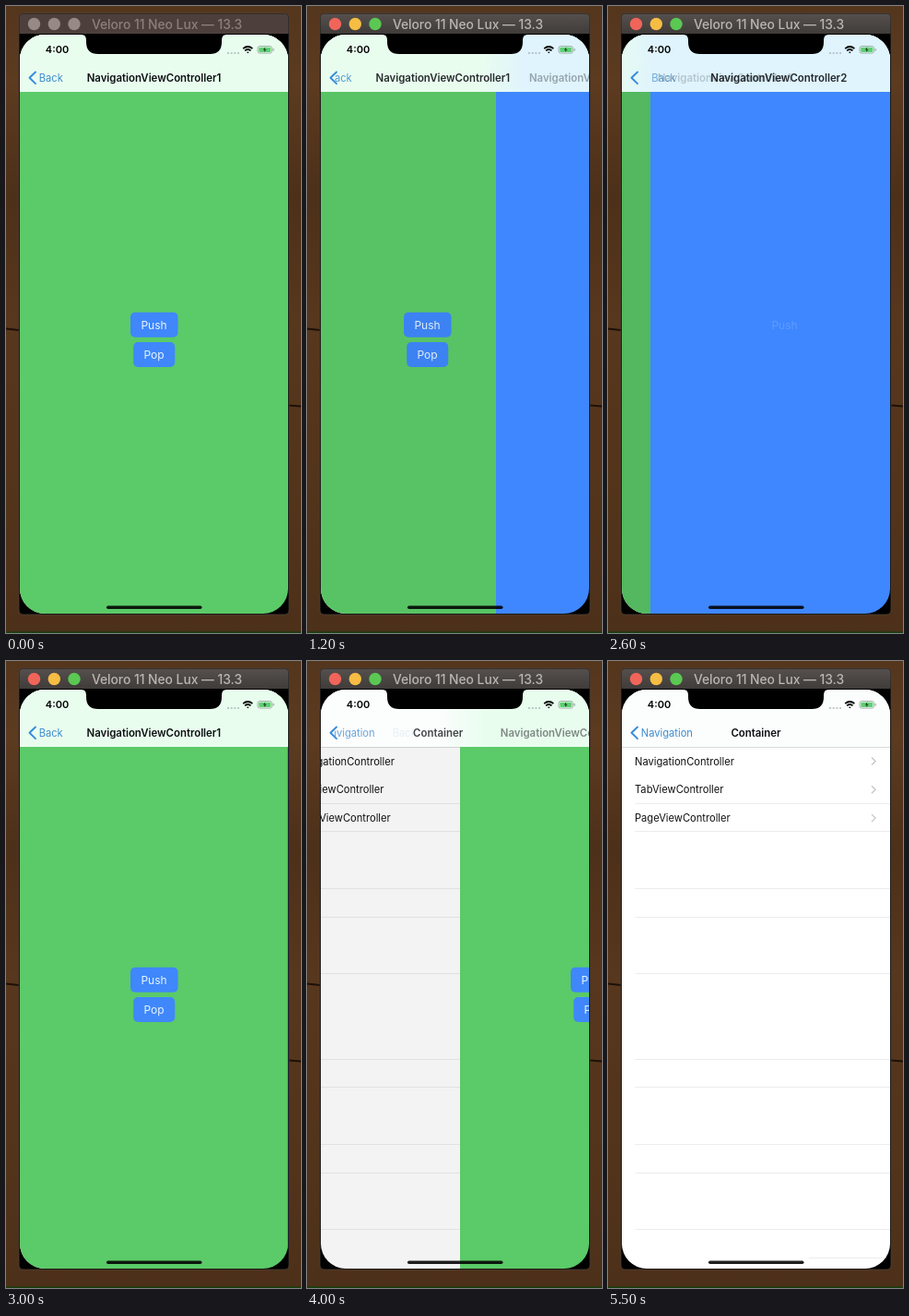
An HTML page for the animation above (5600 ms loop, 320 by 679 pixels).

```html
<!DOCTYPE html>
<html lang="en">
<head>
<meta charset="utf-8">
<title>Navigation stack</title>
<style>
  html, body { margin: 0; height: 100%; overflow: hidden; background: #52341c; }
  svg { display: block; width: 100vw; height: 100vh; font: 11.15px Inter, Roboto, sans-serif; }
  .title { font-size: 11.4px; font-weight: 600; text-anchor: middle; fill: #0c0f12; }
  .back { fill: #3d8bcf; }
  .button { fill: #3f87fb; }
  .label { font-size: 12px; text-anchor: middle; fill: #e9f5ff; }
</style>
</head>
<body>
<svg viewBox="0 0 320 679">
  <defs>
    <linearGradient id="wood" x2="0" y2="1">
      <stop offset="0" stop-color="#54361d"/>
      <stop offset=".12" stop-color="#5c3b20"/>
      <stop offset=".3" stop-color="#4d3019"/>
      <stop offset=".5" stop-color="#57371d"/>
      <stop offset=".8" stop-color="#52341b"/>
      <stop offset="1" stop-color="#4d3019"/>
    </linearGradient>
    <linearGradient id="chrome" x2="0" y2="1">
      <stop offset="0" stop-color="#55504d"/>
      <stop offset="1" stop-color="#403c3a"/>
    </linearGradient>
    <clipPath id="screen"><rect x="15" y="31" width="291" height="627" rx="27"/></clipPath>
    <clipPath id="backArea"><rect x="30" y="60" width="276" height="33"/></clipPath>
  </defs>

  <rect width="320" height="679" fill="url(#wood)"/>
  <path d="M0 349.500L14 351M307 432.500L320 433.500" stroke="#1d1008" stroke-width="2"/>
  <rect y="677.500" width="320" height="1.500" fill="#143f0d"/>

  <path d="M14 654V13q0-5 5-5H302q5 0 5 5V654q0 5-5 5H19q-5 0-5-5Z" fill="#000" stroke="#4a413b" stroke-width=".8"/>
  <path id="titleBar" d="M14.500 30V13q0-4.500 4.500-4.500H302q4.500 0 4.500 4.500V30Z"/>
  <g id="lights"><circle cx="30.500" cy="19.500" r="6.700"/><circle cx="52.300" cy="19.500" r="6.700"/><circle cx="74" cy="19.500" r="6.700"/></g>
  <text id="caption" x="174.500" y="24.800" font-size="13.800" font-weight="500" text-anchor="middle">Veloro 11 Neo Lux — 13.3</text>

  <g clip-path="url(#screen)">
    <g id="pages"></g>
    <g id="bars"></g>
    <g id="backs" clip-path="url(#backArea)"></g>
    <g id="titles"></g>
    <path d="M32 71.500L25.500 77.800L32 84.100" fill="none" stroke="#378cdc" stroke-width="1.9" stroke-linecap="round" stroke-linejoin="round"/>
    <path d="M82 30V31Q87 31 87 37V39Q87 52 100 52H221Q234 52 234 39V37Q234 31 239 31V30Z"/>
    <text x="55.500" y="51.300" font-size="11" font-weight="600" text-anchor="middle">4:00</text>
    <path d="M240 51H253" stroke="#a9b9b6" stroke-width="1.600" stroke-dasharray="2 1.700"/>
    <path d="M257.200 46.200Q262.300 41.800 267.400 46.200M259.100 48.300Q262.300 45.700 265.500 48.300" fill="none" stroke="#000" stroke-width="1.700"/>
    <path d="M261 50L262.300 51.300L263.600 50Q262.300 49 261 50Z"/>
    <rect x="273" y="43.500" width="15.500" height="7.600" rx="2.200" fill="none" stroke="#8d9f96" stroke-width=".8"/>
    <rect x="274.200" y="44.700" width="13.100" height="5.200" rx="1.100" fill="#5fcf72"/>
    <path d="M290.200 46V48.700" stroke="#8d9f96"/>
    <path d="M281.400 44.500L278.700 47.600H280.500L279.900 50.100L282.700 46.900H280.900Z" fill="#1d3a25"/>
    <rect x="109" y="649.500" width="103.500" height="3.500" rx="1.750" opacity=".88"/>
  </g>
</svg>
<script>
const LOOP = 5600, STEP = 100, ACTIVE_FROM = 500;
const WIDTH = 291, BLEED = 50;
const $ = id => document.getElementById(id);

const rules = [2, 3, 5, 6, 8, 11, 12, 14, 15, 17, 18]
  .map(n => `M${n === 18 ? 218 : 29.5} ${Math.round(93 + 30.78 * n) - .5}H306`).join('');
const rows = ['NavigationController', 'TabViewController', 'PageViewController'].map((name, i) => {
  const y = 108.5 + 30.8 * i;
  return `<text x="29" y="${y + 4.1}" fill="#111">${name}</text>
    <path d="M286 ${y - 4}l4 4l-4 4" fill="none" stroke="#c5c5c9" stroke-width="1.3"/>`;
}).join('');

const button = (name, x, y, w) =>
  `<rect class="button" x="${x}" y="${y}" width="${w}" height="27" rx="5"/>
   <text class="label" x="160.500" y="${y + 17.8}">${name}</text>`;

const screens = [
  { title: 'Container', back: 'Navigation', body: '#fff', bar: '#fcfdfd',
    content: `<path d="M15 93.500H306" stroke="#d9d9dc"/><path d="${rules}" stroke="#ececee"/>${rows}` },
  { title: 'NavigationViewController1', back: 'Back', body: '#5bca68', bar: '#e9fdef',
    content: button('Push', 135, 331.7, 51.5) + button('Pop', 138.2, 364, 45) },
  { title: 'NavigationViewController2', back: 'Back', body: '#3f87ff', bar: '#dff4fd',
    content: '<text class="label" x="160.500" y="349.500" opacity=".18">Push</text>' },
];

function add(parent, markup) {
  $(parent).insertAdjacentHTML('beforeend', markup);
  return $(parent).lastElementChild;
}

screens.forEach((s, i) => {
  s.page = add('pages', `<g><rect x="15" y="31" width="291" height="628" fill="${s.body}"/>
    ${s.content}<rect class="dim" x="15" y="31" width="291" height="628"/></g>`);
  s.dim = s.page.querySelector('.dim');
  // The leading edge fades, like the blur behind a translucent bar.
  s.barBox = add('bars', `<g><linearGradient id="edge${i}" gradientUnits="userSpaceOnUse" x1="${15 - BLEED}" x2="15">
      <stop stop-color="${s.bar}" stop-opacity="0"/><stop offset="1" stop-color="${s.bar}"/></linearGradient>
    <rect x="${15 - BLEED}" y="31" width="430" height="62" fill="url(#edge${i})"/></g>`);
  s.backText = add('backs', `<text class="back" x="35.800" y="81.800">${s.back}</text>`);
  s.titleText = add('titles', `<text class="title" x="160.500" y="81.600">${s.title}</text>`);
});

// Critically damped spring from 0 to 1.
function spring(ms) {
  const x = Math.max(0, ms) * .01826;
  return 1 - (1 + x) * Math.exp(-x);
}

const stackDepth = t => 1 + spring(t - 1133) - spring(t - 2570) - spring(t - 3905);

function place(el, x, opacity = 1) {
  el.setAttribute('transform', `translate(${x.toFixed(2)} 0)`);
  el.setAttribute('opacity', Math.max(0, opacity).toFixed(3));
}

function draw(t) {
  const active = t >= ACTIVE_FROM;
  $('titleBar').setAttribute('fill', active ? 'url(#chrome)' : '#4d403c');
  $('caption').setAttribute('fill', active ? '#bbb6b2' : '#8b807b');
  [...$('lights').children].forEach((dot, i) =>
    dot.setAttribute('fill', active ? ['#f0655a', '#f6bd45', '#5ac853'][i] : '#958a86'));

  const depth = stackDepth(t);
  screens.forEach((s, i) => {
    const k = i - depth, ahead = k > 0;
    place(s.page, Math.round(k * WIDTH * (ahead ? 1 : .3)));
    place(s.barBox, ahead ? k * (WIDTH + BLEED) : 0);
    s.dim.setAttribute('opacity', Math.min(.1, Math.max(0, -k * .1)));
    place(s.titleText, k * (ahead ? 236 : 38), ahead ? 1 - k : 1 - k * k);
    place(s.backText, k * (ahead ? 110 : 38), ahead ? Math.max(0, 1 - k) ** 3 : 1 - k * k);
  });
}

const start = performance.now();
function tick() {
  const t = (performance.now() - start) % LOOP;
  draw(Math.floor(t / STEP) * STEP);
  requestAnimationFrame(tick);
}
tick();
</script>
</body>
</html>
```
